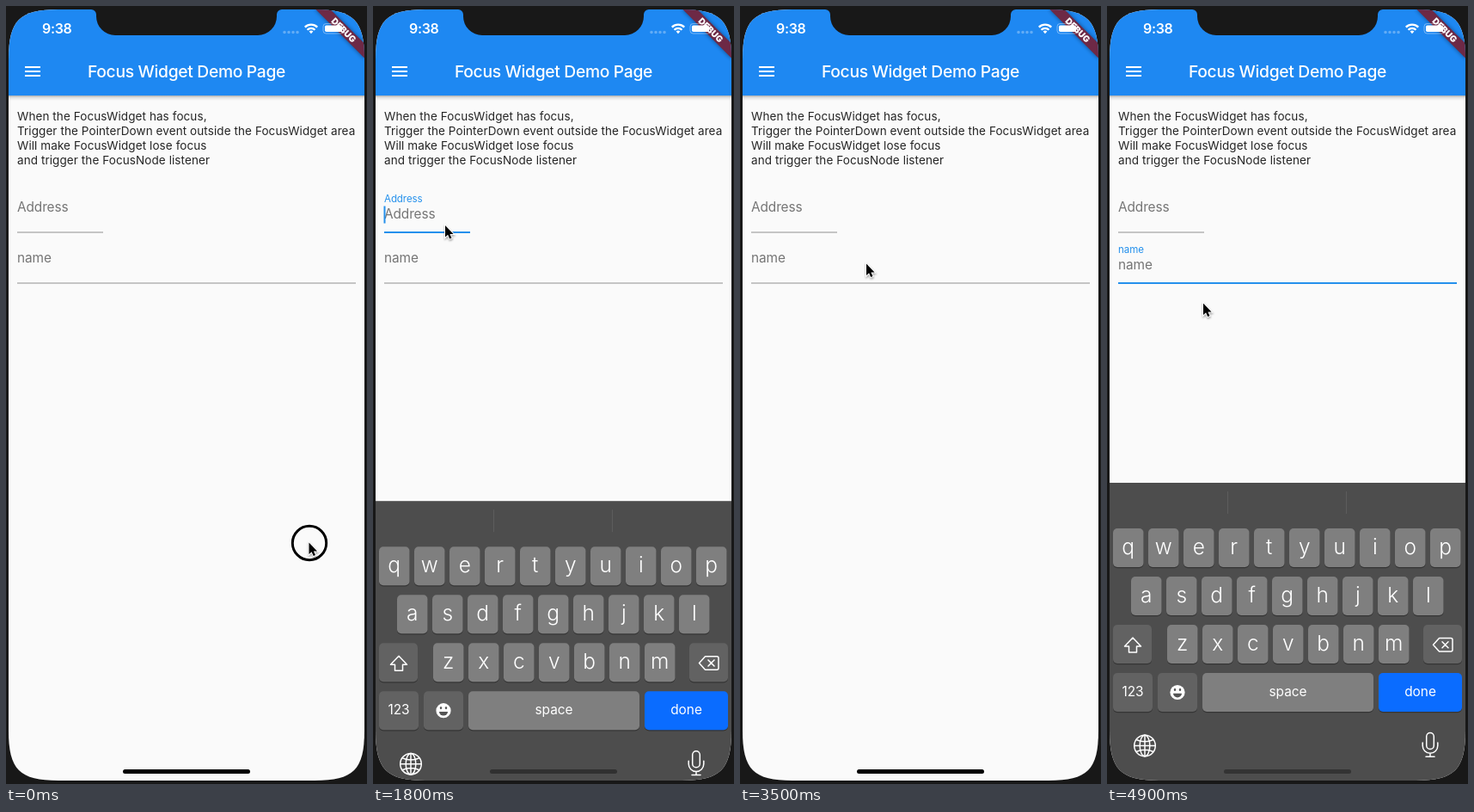
Recreate the animation shown at these times as an HTML page. Size 420 px wide and 904 px high, loop 5000 ms.

```html
<!DOCTYPE html>
<html lang="en">
<head>
<meta charset="utf-8">
<title>Focus demo</title>
<style>
  html, body { margin: 0; width: 100%; height: 100%; overflow: hidden; background: #181818; }
  svg { display: block; width: 420px; height: 904px; }
  text { font-family: Inter, Roboto, sans-serif; white-space: pre; }
  .title { font-size: 19.3px; font-weight: 500; letter-spacing: -.33px; fill: #fff; text-anchor: middle; }
  .body { font-size: 13.5px; letter-spacing: .085px; fill: #252525; }
  .field { font-size: 15.4px; letter-spacing: -.1px; fill: #757575; }
  .key { font-size: 24.5px; font-weight: 300; fill: #fff; text-anchor: middle; }
  .word { font-size: 15.4px; fill: #fff; text-anchor: middle; }
  .line { fill: none; stroke: #fff; stroke-width: 1.5; stroke-linecap: round; stroke-linejoin: round; }
</style>
</head>
<body>
<svg viewBox="0 0 420 904">
  <defs>
    <clipPath id="screen">
      <path d="M3 62C3 16.7 15.7 4 61 4H359C404.3 4 417 16.7 417 62V842C417 887.3 404.3 900 359 900H61C15.7 900 3 887.3 3 842Z"/>
    </clipPath>
    <linearGradient id="shade" x2="0" y2="1">
      <stop stop-color="#000" stop-opacity=".3"/>
      <stop offset=".4" stop-color="#000" stop-opacity=".1"/>
      <stop offset="1" stop-color="#000" stop-opacity="0"/>
    </linearGradient>
    <filter id="soft" x="-50%" y="-150%" width="200%" height="400%">
      <feGaussianBlur stdDeviation="2.5"/>
    </filter>
    <filter id="faint" x="-50%" y="-50%" width="200%" height="200%">
      <feGaussianBlur stdDeviation="1"/>
    </filter>
  </defs>
  <rect width="420" height="904" fill="#181818"/>
  <g clip-path="url(#screen)">
    <rect width="420" height="904" fill="#fafafa"/>
    <rect y="104" width="420" height="6" fill="url(#shade)"/>
    <rect width="420" height="104" fill="#1e88f2"/>
    <path d="M22 71H40M22 76H40M22 81H40" stroke="#fff" stroke-width="2"/>
    <text class="title" x="210" y="83">Focus Widget Demo Page</text>
    <g id="intro" class="body"></g>
    <g id="fields"></g>

    <g transform="translate(417 4) rotate(45)">
      <rect x="-40" y="28" width="80" height="12" opacity=".45" filter="url(#soft)"/>
      <rect x="-40" y="28" width="80" height="12" fill="#6d2946"/>
      <text y="37.7" text-anchor="middle" font-size="10.2" font-weight="900" fill="#fff">DEBUG</text>
    </g>
    <text x="42" y="32.3" font-size="16" font-weight="600" letter-spacing="-.35" fill="#fff">9:38</text>
    <path d="M324 30.5h.01m5 0h.01m5 0h.01m5 0h.01" stroke="#fff" stroke-opacity=".3" stroke-width="3.6" stroke-linecap="round"/>
    <g fill="none" stroke="#fff" stroke-width="2.3">
      <path d="M347.8 24.6a10.2 10.2 0 0 1 14.4 0M350.5 27.7a6.4 6.4 0 0 1 9 0"/>
      <path d="M352.6 29.6a3.4 3.4 0 0 1 4.8 0L355 32.2z" fill="#fff" stroke="none"/>
    </g>
    <rect x="369" y="20.5" width="24" height="11.5" rx="3.4" fill="none" stroke="#fff" stroke-opacity=".4"/>
    <rect x="371" y="22.5" width="20" height="7.5" rx="1.8" fill="#fff"/>

    <g id="keyboard">
      <rect width="420" height="360" fill="#4d4d4d"/>
      <path d="M140.5 10V36M278.5 10V36" stroke="#5d5d5d"/>
      <g id="keys"></g>
      <path class="line" d="M30 180L20.5 190H25.5V197H34.5V190H39.5Z"/>
      <path class="line" d="M386.5 180.5H400a2 2 0 0 1 2 2V194a2 2 0 0 1-2 2H386.5L379.5 188.2ZM390 184.7l7 7m0-7l-7 7"/>
      <circle cx="82" cy="243.5" r="8.6" fill="#fff"/>
      <path d="M77 244.8h10a5 4.6 0 0 1-10 0z" fill="#555"/>
      <ellipse cx="79" cy="240.4" rx="1.2" ry="1.7" fill="#555"/>
      <ellipse cx="85" cy="240.4" rx="1.2" ry="1.7" fill="#555"/>
      <g class="line" transform="translate(44 305.5)">
        <circle r="12.3"/><ellipse rx="5.8" ry="12.3"/>
        <path d="M0-12.3V12.3M-12.3 0H12.3M-10-7Q0-2.5 10-7M-10 7Q0 2.5 10 7"/>
      </g>
      <g class="line" transform="translate(376 304)">
        <rect x="-4.3" y="-13.5" width="8.6" height="19" rx="4.3"/>
        <path d="M-8.8-2V1.5a8.8 8.8 0 0 0 17.6 0V-2M0 10.3V14.3M-5 14.3H5"/>
      </g>
    </g>
    <rect id="home" x="136" y="887" width="148" height="5" rx="2.5"/>
  </g>
  <path d="M99 0V4A6 6 0 0 1 105 10V12A22 22 0 0 0 127 34H293A22 22 0 0 0 315 12V10A6 6 0 0 1 321 4V0Z" fill="#181818"/>
  <g id="ring" fill="none">
    <circle r="19.7" stroke="#fff" stroke-opacity=".8" stroke-width="5.4"/>
    <circle r="19.7" stroke="#000" stroke-width="3"/>
  </g>
  <g id="pointer">
    <path d="M0 0V13.6L3.1 10.7L5.2 15.5L7.5 14.5L5.4 9.9H9.6Z" transform="translate(.3 1.5)" stroke="#000" stroke-width="2" opacity=".35" filter="url(#faint)"/>
    <path d="M0 0V13.6L3.1 10.7L5.2 15.5L7.5 14.5L5.4 9.9H9.6Z" stroke="#fff" stroke-width="2" paint-order="stroke"/>
  </g>
</svg>
<script>
const $ = id => document.getElementById(id);
const LOOP = 5000, STEP = 100;
const GRAY = [117, 117, 117], RULE = [176, 176, 176], BLUE = [36, 144, 236];
const BLACK = [0, 0, 0], DIM = [51, 51, 51];

function add(parent, tag, attrs, text) {
  const el = document.createElementNS('http://www.w3.org/2000/svg', tag);
  set(el, attrs);
  if (text) el.textContent = text;
  return parent.appendChild(el);
}

function set(el, attrs) {
  for (const k in attrs) el.setAttribute(k, attrs[k]);
}

const clamp = v => Math.min(1, Math.max(0, v));
const mix = (a, b, p) => a + (b - a) * p;
const smooth = p => p * p * (3 - 2 * p);
const blend = (a, b, p) => `rgb(${a.map((v, i) => Math.round(mix(v, b[i], p)))})`;

['When the FocusWidget has focus,',
 'Trigger the PointerDown event outside the FocusWidget area',
 'Will make FocusWidget lose focus',
 'and trigger the FocusNode listener'
].forEach((s, i) => add($('intro'), 'text', { x: 13, y: 133 + 17 * i }, s));

function key(x, y, w, fill, label, cls = 'word') {
  add($('keys'), 'rect', { x, y: y + 1.2, width: w, height: 45, rx: 5, fill: '#353535' });
  add($('keys'), 'rect', { x, y, width: w, height: 45, rx: 5, fill });
  if (label) add($('keys'), 'text', { x: x + w / 2, y: y + (cls === 'key' ? 30 : 27), class: cls }, label);
}

[['qwertyuiop', 7], ['asdfghjkl', 28], ['zxcvbnm', 70]].forEach(([row, x], r) =>
  [...row].forEach((c, i) => key(x + 41 * i, 53 + 56 * r, 35.5, '#7f7f7f', c, 'key')));
key(7, 165, 45, '#626262');
key(368, 165, 45, '#626262');
key(7, 221, 46, '#626262', '123');
key(59, 221, 46, '#626262');
key(111, 221, 199, '#7f7f7f', 'space');
key(316, 221, 97, '#0a6cff', 'done');

function makeField(name, y, width, on, off, caretAt) {
  const g = add($('fields'), 'g', { transform: `translate(13 ${y})` });
  const rule = add(g, 'rect', { width });
  const hint = add(g, 'text', { class: 'field', y: 8 }, name);
  const label = add(g, 'text', { class: 'field' }, name);
  const caret = add(g, 'rect', { x: -.5, y: -6.5, width: 2, height: 20, fill: `rgb(${BLUE})` });
  return t => {
    const p = smooth(clamp((t - on) / 200)) * (1 - smooth(clamp((t - off) / 200)));
    const thick = mix(1.4, 2, p);
    set(rule, { y: 24 - thick / 2, height: thick, fill: blend(RULE, BLUE, p) });
    set(hint, { opacity: p });
    set(label, { transform: `translate(0 ${-11 * p}) scale(${1 - .25 * p})` });
    label.style.fill = blend(GRAY, BLUE, p);
    set(caret, { opacity: t >= on && t < off ? blink(t - caretAt) : 0 });
  };
}

// Toggles every 500 ms after a 650 ms hold, with a 250 ms fade.
function blink(t) {
  if (t < 650) return 1;
  const n = Math.floor((t - 650) / 500);
  const fade = clamp((t - 650 - n * 500) / 250);
  return n % 2 ? fade : 1 - fade;
}

const fields = [
  makeField('Address', 239, 100, 1520, 2920, 1600),
  makeField('name', 298, 394, 3980, LOOP, 4000)
];

// Critically damped spring from 0 to 1.
function spring(ms) {
  const x = Math.max(0, ms) * .01826;
  return 1 - (1 + x) * Math.exp(-x);
}

const path = [
  [100, 352.5, 623.5], [650, 104, 282], [1200, 84, 255], [1900, 84, 255],
  [2500, 178, 237], [3200, 178, 237], [3500, 147, 299.5], [3750, 139, 310.5],
  [4300, 139, 310.5], [4900, 112, 345.5]
];

function pointerAt(t) {
  const i = path.findIndex(p => p[0] >= t);
  if (i <= 0) return path[0].slice(1);
  const [a, b] = [path[i - 1], path[i]];
  const p = smooth((t - a[0]) / (b[0] - a[0]));
  return [mix(a[1], b[1], p), mix(a[2], b[2], p)];
}

const clicks = [0, 1400, 2700, 3850];
const SHOW = 1553, HIDE = 2847, SHOW_AGAIN = 4030;

function render(t) {
  fields.forEach(update => update(t));
  const hiding = t >= HIDE && t < SHOW_AGAIN;
  const shown = hiding ? 1 - spring(t - HIDE) : spring(t - (t < HIDE ? SHOW : SHOW_AGAIN));
  set($('keyboard'), { transform: `translate(0 ${904 - 350 * shown})` });
  set($('home'), { fill: blend(BLACK, DIM, hiding ? 0 : shown) });
  const [x, y] = pointerAt(t);
  set($('pointer'), { transform: `translate(${x} ${y})` });
  set($('ring'), {
    transform: `translate(${x + .5} ${y + .5})`,
    opacity: clicks.some(c => t >= c && t < c + 160) ? 1 : 0
  });
}

const start = performance.now();
function tick() {
  const t = (performance.now() - start) % LOOP;
  render(Math.floor(t / STEP) * STEP);
  requestAnimationFrame(tick);
}
tick();
</script>
</body>
</html>
```
